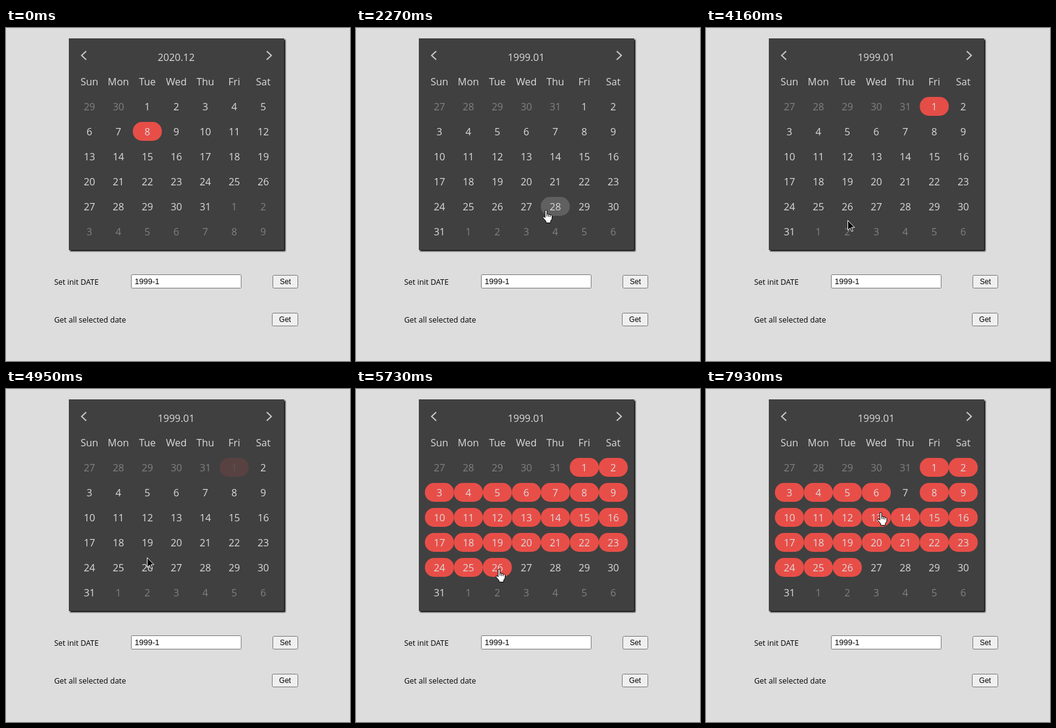
These frames come from a looping animation (564x546 px, 7990 ms). An HTML page:

```html
<!DOCTYPE html>
<html lang="en">
<head>
<meta charset="utf-8">
<title>Calendar picker</title>
<style>
  html, body { margin: 0; width: 100%; height: 100%; overflow: hidden; background: #ddd; }
  svg { display: block; width: 564px; height: 546px; }
  .cal { font-family: "Open Sans", "Noto Sans", sans-serif; font-size: 16.4px; text-anchor: middle; }
  .label { font: 12.5px "Open Sans", "Noto Sans", sans-serif; }
  .field { font: 13px "Liberation Sans", Arial, sans-serif; }
  .button { font-size: 12px; text-anchor: middle; }
  .chevron { fill: none; stroke: #c8c8c8; stroke-width: 2; }
  .cursor { stroke-linejoin: round; }
  .panel { filter: drop-shadow(2px 2px 1px #000); }
</style>
</head>
<body>
<svg id="stage" viewBox="0 0 564 546">
  <rect width="564" height="546" fill="#ddd"/>
  <rect class="panel" x="103" y="17" width="353" height="347" fill="#404040"/>
  <path class="chevron" d="M131.5 38l-7.5 7 7.5 7M427.5 38l7.5 7-7.5 7"/>
  <g class="cal" id="calendar" fill="#dadada"><text id="title" x="279" y="53.5"/></g>
  <text class="label" x="79" y="421">Set init DATE</text>
  <text class="label" x="79" y="483">Get all selected date</text>
  <g class="field">
    <rect x="205.5" y="404.5" width="180" height="22" rx="1" fill="#fff" stroke="#767676"/>
    <text x="211" y="420">1999-1</text>
    <g class="button">
      <rect id="set" x="437.5" y="405.5" width="41" height="21" rx="2"/>
      <text x="458" y="420">Set</text>
      <rect x="436.5" y="467.5" width="42" height="21" rx="2" fill="#efefef" stroke="#767676"/>
      <text x="457.5" y="482">Get</text>
    </g>
  </g>
  <path id="arrow" class="cursor" fill="#000" stroke="#fff" d="M.5 .5V16.5L4.3 13l2.5 5.6 2.2-1L6.6 12h5z"/>
  <g id="hand" class="cursor" fill="#fff" stroke="#000">
    <path d="M4 13V2a1.5 1.5 0 0 1 3 0V7q1.7-.8 2.6.6 1.7-.7 2.6.8 2.6-.5 3.2 1.6V15L13 18.5v3H5.5V19L1 13.6Q0 11 2 10.8z"/>
    <path d="M7 7v4M9.6 7.6V11.5M12.2 8.4V12" fill="none"/>
  </g>
</svg>
<script>
const LOOP = 7990;
const COL = 47.5, ROW = 41, LEFT = 113, TOP = 113, PILL = 31;
const TEXT = '#dadada', FADED = '#808080', RED = '#e84e48', HOVER = '#606060';

const PRESS = 1470, LOAD = 1560;            // the Set button goes down, the new month appears
const START = 3450, RANGE = 5520;           // first and last day of the range are clicked
const REMOVE = 7520;                        // one day is taken out again
const BLINK = 3640, BLINK_PERIOD = 500;

// The pointer's stops: it arrives at a place and rests there until it leaves.
const stop = (arrive, x, y, leave = arrive) => ({ arrive, x, y, leave });
const STOPS = [
  stop(620, 517, 519),
  stop(1020, 453, 385),
  stop(1320, 459, 413, 1900),
  stop(2270, 311, 298),
  stop(2740, 262, 244),
  stop(3280, 373, 128, 3620),
  stop(4160, 232, 315),
  stop(4420, 230, 321, 4520),
  stop(4950, 231, 276),
  stop(5430, 234, 295, 5780),
  stop(6120, 276, 341),
  stop(6580, 269, 356, 6850),
  stop(7370, 318, 160, 7560),
  stop(7930, 286, 202, LOOP)
];

const $ = id => document.getElementById(id);
const calendar = $('calendar');

function add(parent, tag, attrs) {
  const node = document.createElementNS('http://www.w3.org/2000/svg', tag);
  for (const key in attrs) node.setAttribute(key, attrs[key]);
  return parent.appendChild(node);
}

const centre = col => LEFT + COL * (col + .5);

['Sun', 'Mon', 'Tue', 'Wed', 'Thu', 'Fri', 'Sat'].forEach((name, col) => {
  add(calendar, 'text', { x: centre(col), y: 94 }).textContent = name;
});

const cells = Array.from({ length: 42 }, (_, i) => {
  const col = i % 7, row = Math.floor(i / 7);
  const group = add(calendar, 'g', {});
  const x = LEFT + COL * col, y = TOP + ROW * row;
  const pill = add(group, 'rect', { x, y, width: COL, height: PILL, rx: 15 });
  const text = add(group, 'text', { x: centre(col), y: y + 22 });
  return { x, y, group, pill, text };
});

function pointerAt(t) {
  const next = STOPS.findIndex(s => s.leave > t);
  const to = STOPS[next], from = STOPS[next - 1];
  if (t >= to.arrive) return [to.x, to.y];
  if (!from) return [-100, -100];
  const k = (t - from.leave) / (to.arrive - from.leave);
  const e = (k + k * k * (3 - 2 * k)) / 2;
  return [from.x + (to.x - from.x) * e, from.y + (to.y - from.y) * e];
}

function isSelected(day, t) {
  if (t < LOAD) return day === 8;
  if (t < START) return false;
  if (t < RANGE) return day === 1;
  return day <= 26 && !(day === 7 && t >= REMOVE);
}

const inside = (px, py, x, y, w, h) => px >= x && px < x + w && py >= y && py < y + h;

function drawSetButton(x, y, t) {
  const over = inside(x, y, 437, 405, 42, 22);
  const pressed = over && t >= PRESS && t < LOAD;
  $('set').setAttribute('fill', pressed ? '#f5f5f5' : over ? '#e5e5e5' : '#efefef');
  $('set').setAttribute('stroke', pressed ? '#8d8d8d' : over ? '#4f4f4f' : '#767676');
}

function drawCalendar(x, y, t) {
  const [year, month] = t < LOAD ? [2020, 11] : [1999, 0];
  const offset = new Date(year, month, 1).getDay();
  const blinking = t >= BLINK && t < RANGE;
  const blink = (1 + Math.cos((t - BLINK) / BLINK_PERIOD * 2 * Math.PI)) / 2;
  let overDay = false;

  $('title').textContent = year + '.' + String(month + 1).padStart(2, '0');
  cells.forEach((cell, i) => {
    const date = new Date(year, month, i - offset + 1);
    const day = date.getDate(), current = date.getMonth() === month;
    const over = current && inside(x, y, cell.x, cell.y, COL, PILL);
    const selected = current && isSelected(day, t);
    overDay = overDay || over;
    cell.text.textContent = day;
    cell.text.setAttribute('fill', current ? TEXT : FADED);
    cell.pill.setAttribute('fill', selected ? RED : over ? HOVER : 'none');
    cell.group.setAttribute('opacity', blinking && selected ? blink : 1);
  });
  return overDay;
}

function drawPointer(x, y, overDay) {
  const px = Math.round(x), py = Math.round(y);
  $('arrow').setAttribute('transform', `translate(${px} ${py})`);
  $('hand').setAttribute('transform', `translate(${px - 5} ${py})`);
  $('arrow').setAttribute('visibility', overDay ? 'hidden' : 'visible');
  $('hand').setAttribute('visibility', overDay ? 'visible' : 'hidden');
}

function draw(t) {
  const [x, y] = pointerAt(t);
  drawSetButton(x, y, t);
  drawPointer(x, y, drawCalendar(x, y, t));
}

const begin = performance.now();
function tick() {
  draw((performance.now() - begin) % LOOP);
  requestAnimationFrame(tick);
}
tick();
</script>
</body>
</html>
```
